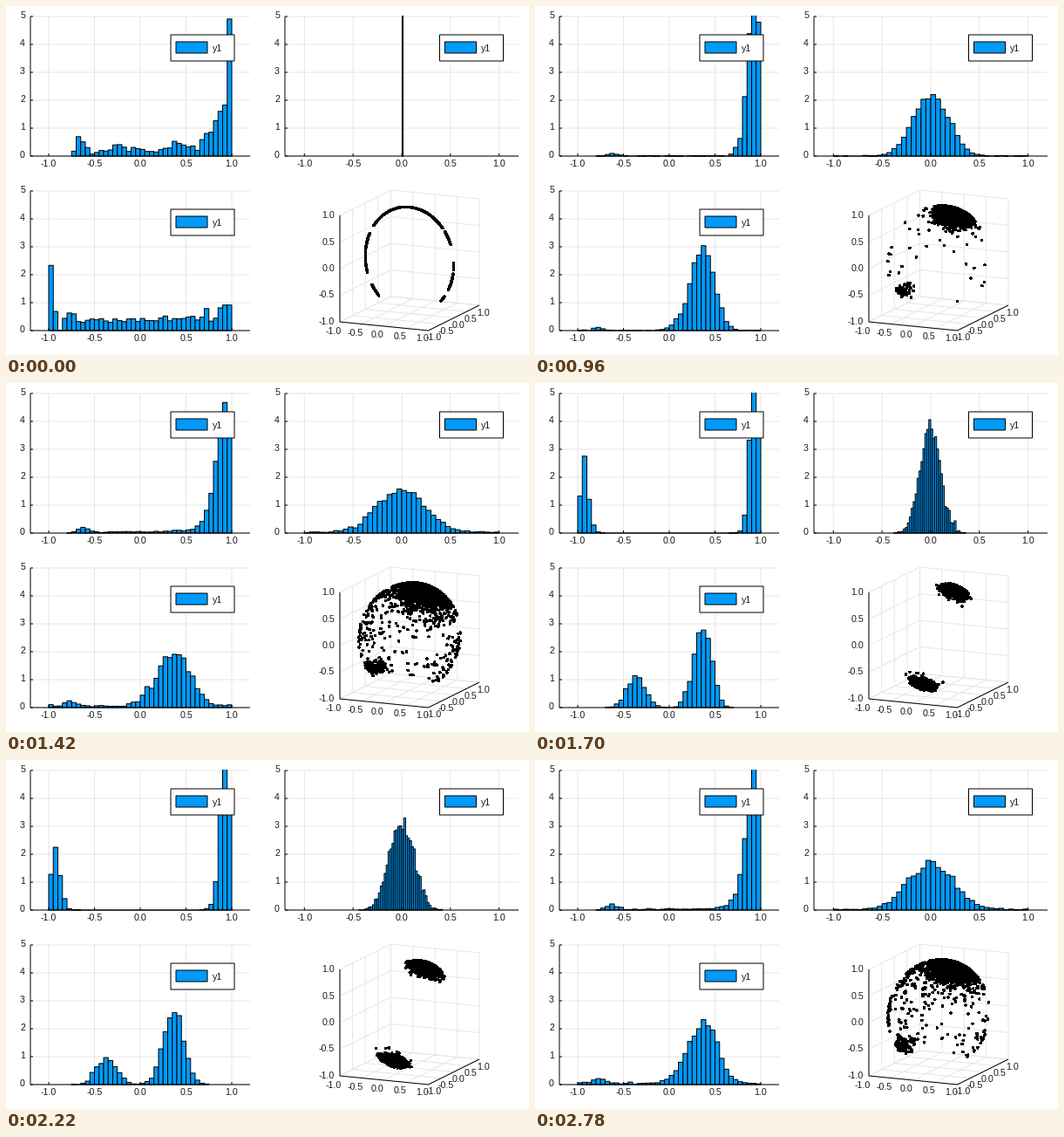
A matplotlib script for the animation above (2.88 s loop, 600 by 400 pixels).

```python
import numpy as np
import matplotlib.pyplot as plt
from matplotlib.animation import FuncAnimation
from matplotlib.collections import LineCollection, PolyCollection
from matplotlib.patches import Rectangle

W, H, DPI = 600, 400, 100
PX = 72 / DPI                      # one pixel in points
BLUE = "#009AFA"
GRID = "0.9"
N = 4000
STATES = 60
TILT = 0.38                        # angle of the main direction from +z

plt.rcParams["font.family"] = "Liberation Sans"
fig = plt.figure(figsize=(W / DPI, H / DPI), dpi=DPI, facecolor="white")
ax = fig.add_axes([0, 0, 1, 1])
ax.set(xlim=(0, W), ylim=(H, 0))
ax.axis("off")


def lines(segments, color, z):
    ax.add_collection(LineCollection(segments, colors=color, linewidths=PX,
                                     zorder=z, snap=False), autolim=False)


def label(x, y, text, ha="center"):
    ax.text(x, y, text, ha=ha, va="center", fontsize=10.6 * PX,
            color="0.1", zorder=8)


def box(x, y, w, h, color):
    ax.add_patch(Rectangle((x, y), w, h, fc=color, ec="black", lw=PX,
                           zorder=6, snap=False))


class Histogram:
    """Density histogram on [-1.2, 1.2] x [0, 5], placed in pixels."""

    def __init__(self, left, top, width, legend):
        self.left, self.base, self.scale = left, top + 160, width / 2.4
        right = left + width
        ticks = np.arange(-2, 3) / 2
        xs = self.x(ticks)
        ys = [self.y(v) for v in range(6)]
        lines([[(x, top), (x, self.base)] for x in xs], GRID, 1)
        lines([[(left, y), (right, y)] for y in ys], GRID, 1)
        lines([[(left, top), (left, self.base)],
               [(left, self.base), (right, self.base)]], "black", 4)
        lines([[(x, self.base), (x, self.base - 3)] for x in xs], "black", 4)
        lines([[(left, y), (left + 3, y)] for y in ys], "black", 4)
        for v, x in zip(ticks, xs):
            label(x, self.base + 9, f"{v:.1f}")
        for v, y in enumerate(ys):
            label(left - 6, y - 0.5, str(v), "right")

        self.bars = PolyCollection([], facecolors=BLUE, edgecolors="black",
                                   linewidths=PX, zorder=3, snap=False)
        ax.add_collection(self.bars, autolim=False)
        self.bars.set_clip_path(Rectangle((left, top - 1), width, 162,
                                          transform=ax.transData))

        box(legend, top + 21, 73, 30, "white")
        box(legend + 6, top + 29, 36, 13, BLUE)
        label(legend + 47.5, top + 36.5, "y1", "left")

    def x(self, v):
        return self.left + (v + 1.2) * self.scale

    def y(self, v):
        return self.base - 32 * v

    def update(self, data):
        lo, hi = data.min(), data.max()
        span = hi - lo
        step = 0.01 if span < 1e-9 else 0.02 if span < 1.28 else 0.05
        first, last = np.floor(lo / step), np.ceil(hi / step)
        edges = np.arange(first, max(last, first + 1) + 1) * step
        height, _ = np.histogram(data, edges, density=True)
        a, b = self.x(edges[:-1]), self.x(edges[1:])
        top = self.y(np.minimum(height, 8))
        base = np.full_like(top, self.base)
        self.bars.set_verts(np.stack([np.c_[a, base], np.c_[a, top],
                                      np.c_[b, top], np.c_[b, base]], axis=1))


def project(x, y, z):
    return 463 + 50.75 * x + 29.25 * y, 291.5 + 5 * x - 14.5 * y - 61 * z


def draw_cube():
    ticks = np.arange(-2, 3) / 2
    grid = []
    for t in ticks:
        for ends in [((t, -1, -1), (t, 1, -1)), ((t, 1, -1), (t, 1, 1)),
                     ((-1, t, -1), (1, t, -1)), ((-1, t, -1), (-1, t, 1)),
                     ((-1, -1, t), (-1, 1, t)), ((-1, 1, t), (1, 1, t))]:
            grid.append([project(*p) for p in ends])
    lines(grid, GRID, 1)
    path = [(-1, -1, 1), (-1, -1, -1), (1, -1, -1), (1, 1, -1)]
    lines([[project(*p) for p in path]], "black", 2)
    for i, t in enumerate(ticks):
        text = f"{t:.1f}"
        label(377, project(-1, -1, t)[1], text, "right")
        label(375.5 + 25.4 * i, 372.5 + 2 * i, text)
        label(490.5 + 14.2 * i, 380 - 6.9 * i, text)


# arcs of the ring away from its top: start, end (degrees), weight
ARCS = [(53, 68, .08), (88, 96, .02), (100, 119, .06), (128, 135, .03),
        (-78, -64, .06), (-108, -78, .085), (-136, -122, .055)]
# sharpness of the directions over the states
KEYS = [0, 5, 11, 16, 20, 26, 31.5, 37, 42, 47, 53, 59]
SHARP = [0, 9, 3.5, 10, 5.6, 12, 3.5, 9.6, 3.5, 8.1, 3.5, 4.6]
LEVELS = [0, 3.5, 4.6, 5.6, 8.1, 9.6, 12]
SPREAD = [.25, .215, .178, .145, .12, .104, .083]
STRAY = [1, .25, .1, .018, 0, 0, 0]
SPOT = [0, .025, .025, .012, 0, 0, 0]
FLIP = [0, 0, 0, 0, .25, .28, .47]


def ring_angles(rng):
    start, end, weight = np.array(ARCS).T
    pick = rng.choice(len(ARCS), N, p=weight / weight.sum())
    side = np.radians(rng.uniform(start[pick], end[pick]))
    x = rng.triangular(-2.9, .75, .75, 4 * N)
    x = np.resize(x[x > -.81], N)
    return np.where(rng.random(N) < 1 - weight.sum(), np.arcsin(x), side)


def sample(state):
    rng = np.random.default_rng(state)
    q = np.interp(state, KEYS, SHARP)
    spread, stray, spot, flip = (np.interp(q, LEVELS, t)
                                 for t in (SPREAD, STRAY, SPOT, FLIP))
    wide = min(q / LEVELS[1], 1)
    a, b = rng.normal(size=(2, N))
    theta = TILT + spread * a
    phi = b / max(q, LEVELS[1])

    u = rng.random(N)
    loose = u < stray
    theta = np.where(loose, ring_angles(rng) + .08 * wide * a, theta)
    phi = np.where(loose, .55 * wide * b, phi)
    near = (u >= stray) & (u < stray + spot)
    theta = np.where(near, -2.25 + .07 * a, theta)
    phi = np.where(near, .17 * b, phi)

    sign = np.where(rng.random(N) < flip, -1, 1)
    return sign * np.array([np.sin(theta) * np.cos(phi), np.sin(phi),
                            np.cos(theta) * np.cos(phi)])


hist_z = Histogram(28, 12, 252, 189)
hist_y = Histogram(320, 12, 268, 497.5)
hist_x = Histogram(28, 212, 252, 189)
draw_cube()
# two edge widths keep each dot at its exact, unrounded place
dots = ax.scatter(np.zeros(N), np.zeros(N), s=(1.75 * PX) ** 2,
                  facecolors=BLUE, edgecolors="black",
                  linewidths=[.65 * PX, .75 * PX], antialiased=False, zorder=5)

# every third state and the last one rest for 100 ms, the others for 20 ms
HOLD = [5 if i % 3 == 1 or i == STATES - 1 else 1 for i in range(STATES)]
TIMELINE = np.repeat(np.arange(STATES), HOLD)


def update(tick):
    x, y, z = sample(int(TIMELINE[tick]))
    hist_z.update(z)
    hist_y.update(y)
    hist_x.update(x)
    dots.set_offsets(np.column_stack(project(x, y, z)))
    return dots, hist_x.bars, hist_y.bars, hist_z.bars


anim = FuncAnimation(fig, update, frames=len(TIMELINE), interval=20,
                     init_func=lambda: update(0), repeat=True,
                     repeat_delay=0, blit=False)
plt.show()
```
